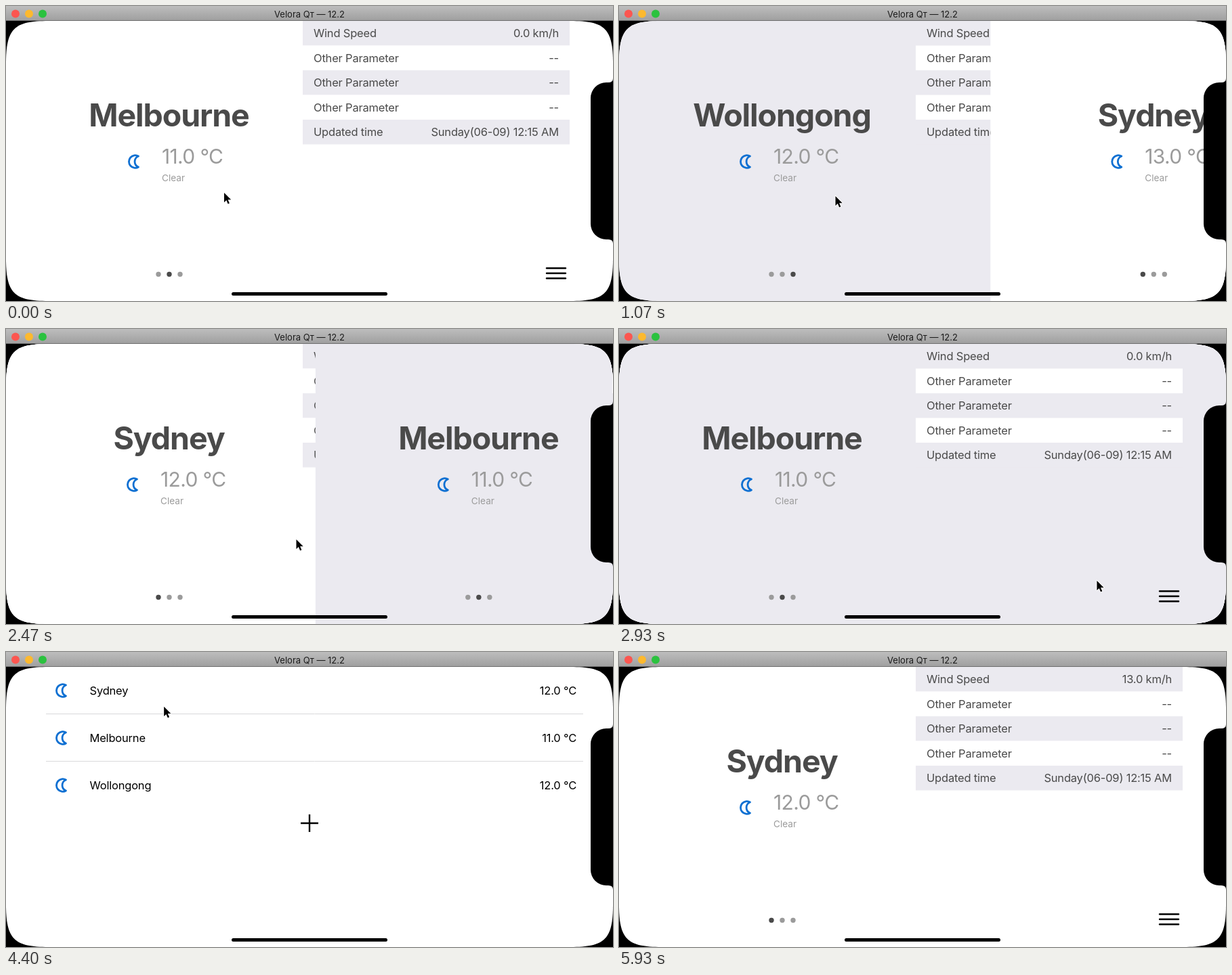
Recreate the animation shown at these times as an HTML page with a canvas. Size 896 by 436 pixels, loop 5.99 s.

```html
<!DOCTYPE html>
<html lang="en">
<head>
<meta charset="utf-8">
<title>Weather pages</title>
<style>
  html, body { margin: 0; width: 100%; height: 100%; overflow: hidden; background: #000; }
  canvas { display: block; }
</style>
</head>
<body>
<canvas id="stage" width="896" height="436"></canvas>
<script>
const ctx = document.getElementById('stage').getContext('2d');
const W = 896, H = 436, LOOP = 5990;
const LAVENDER = '#ebeaf0', BLUE = '#0f70d2';
const MOON = new Path2D('M6.5-8A9.3 9.3 0 1 0 6.5 8A8.6 8.6 0 0 1 6.5-8Z');
const ARROW = new Path2D('M0 0V14.2L3.3 11.1L5.6 16.4L7.9 15.4L5.6 10.2H10.2Z');
const NOTCH = new Path2D('M896 107Q896 113 889 113H886A23 23 0 0 0 863 136V322A23 23 0 0 0 886 345H889Q896 345 896 351Z');
// Display outline with continuous-curvature corners
const DISPLAY = new Path2D(`M63 22H833C884.5 22 896 33.5 896 85V373C896 424.5 884.5 436 833 436
  H63C11.5 436 0 424.5 0 373V85C0 33.5 11.5 22 63 22Z`);

const CITIES = [
  { name: 'Sydney', temp: '12.0 °C', wind: '13.0 km/h', left: 228 },
  { name: 'Melbourne', temp: '11.0 °C', wind: '0.0 km/h', left: 230 },
  { name: 'Wollongong', temp: '12.0 °C', wind: '13.0 km/h', left: 228 }
];
const SWIPES = [
  { at: 50, city: 2, bg: LAVENDER },
  { at: 949.5, city: 0, bg: '#fff' },
  { at: 2334.3, city: 1, bg: LAVENDER }
];
const SLIDE = 395, HERO = 492, CLOSE = 3320, OPEN = 4730, REFRESH = 1530;

// Pointer way points: time, x, y
const POINTER = [
  [0, 322, 276], [200, 322, 276], [600, 470, 288], [820, 480, 286], [1000, 319.5, 281],
  [1250, 319.5, 281], [1850, 803.5, 400], [2080, 803.5, 400], [2270, 640, 335], [2420, 434, 312],
  [2470, 428.5, 311], [2600, 428.5, 311], [3050, 805, 394], [3320, 805, 394], [3470, 660.5, 376],
  [3670, 600, 374], [4200, 320, 178], [4400, 233.5, 81], [4530, 190, 52], [5000, 190, 52],
  [5300, 300, 300], [5550, 380, 440], [LOOP, 380, 440]
];
const TEMP_STYLE = { weight: 370, track: -0.65 };

const mix = (a, b, k) => a + (b - a) * k;
const gray = v => `rgb(${v},${v},${v})`;

// cubic-bezier(.4, 0, .2, 1)
function ease(t) {
  if (t <= 0) return 0;
  if (t >= 1) return 1;
  let lo = 0, hi = 1, s;
  for (let i = 0; i < 20; i++) {
    s = (lo + hi) / 2;
    const x = 1.2 * s * (1 - s) ** 2 + 0.6 * s * s * (1 - s) + s ** 3;
    if (x < t) lo = s; else hi = s;
  }
  return s * s * (3 - 2 * s);
}

// Text whose capitals are centred on y
function text(str, x, y, size, color, { weight = 400, align = 'left', track = -0.2 } = {}) {
  ctx.font = `${weight} ${size}px Inter, sans-serif`;
  ctx.letterSpacing = track + 'px';
  ctx.textAlign = align;
  ctx.fillStyle = color;
  ctx.fillText(str, x, y + size * 0.364);
}

function line(x1, y1, x2, y2, width, color, cap = 'butt') {
  ctx.lineWidth = width;
  ctx.strokeStyle = color;
  ctx.lineCap = cap;
  ctx.beginPath();
  ctx.moveTo(x1, y1);
  ctx.lineTo(x2, y2);
  ctx.stroke();
}

function dot(x, y, r, color) {
  ctx.fillStyle = color;
  ctx.beginPath();
  ctx.arc(x, y, r, 0, 7);
  ctx.fill();
}

function moon(x, y) {
  ctx.save();
  ctx.translate(x, y);
  ctx.lineWidth = 2.8;
  ctx.lineJoin = 'round';
  ctx.strokeStyle = BLUE;
  ctx.stroke(MOON);
  ctx.restore();
}

function page(index, x, bg, { temp = CITIES[index].temp, bare = false } = {}) {
  const city = CITIES[index];
  ctx.save();
  ctx.translate(x, 0);
  ctx.fillStyle = bg;
  ctx.fillRect(0, 22, W, H);
  if (!bare) {
    text(city.name, 240.5, 161, 46.5, '#4a4a4a', { weight: 700, align: 'center', track: -1.1 });
    moon(city.left - 41, 230);
    text(temp, city.left, 222, 30, '#9b9b9b', TEMP_STYLE);
  }
  text('Clear', city.left, 254, 13.6, '#9b9b9b', { track: 0 });

  const rows = [['Wind Speed', city.wind], ['Other Parameter', '--'], ['Other Parameter', '--'],
    ['Other Parameter', '--'], ['Updated time', 'Sunday(06-09) 12:15 AM']];
  rows.forEach(([label, value], i) => {
    const y = 22 + 36.5 * i;
    ctx.fillStyle = i % 2 ? '#fff' : LAVENDER;
    ctx.fillRect(438, y, 394, 36.5);
    text(label, 454, y + 18.3, 16.5, '#4a4a4a');
    text(value, 816, y + 18.3, 16.5, '#4a4a4a', { align: 'right' });
  });

  for (let i = 0; i < 3; i++) {
    dot(225 + 16 * i, 396.5, 3.7, i === index ? '#4a4a4a' : '#9b9b9b');
    line(798, 387.5 + 7.5 * i, 826, 387.5 + 7.5 * i, 2.4, '#000', 'round');
  }
  ctx.restore();
}

function list(hidden) {
  ctx.fillStyle = '#fff';
  ctx.fillRect(0, 22, W, H);
  CITIES.forEach((city, i) => {
    const y = 57 + 70 * i;
    if (i < 2) line(59, y + 34.5, 852, y + 34.5, 1, '#d9d9db');
    if (i === hidden) return;
    moon(82, y);
    text(city.name, 123.5, y, 16.5, '#000');
    text(city.temp, 842, y, 16.5, '#000', { align: 'right' });
  });
  line(435, 253, 461, 253, 2.4, '#000');
  line(448, 240, 448, 266, 2.4, '#000');
}

// Title, moon and temperature travelling between list row and page
function hero(index, elapsed, opening) {
  const city = CITIES[index], row = 57 + 70 * index;
  const amount = duration => opening ? ease(elapsed / duration) : 1 - ease(elapsed / duration);

  let k = amount(336);
  moon(mix(82, city.left - 41, k), mix(row, 230, k));

  k = amount(376);
  ctx.font = '700 46.5px Inter, sans-serif';
  ctx.letterSpacing = '-1.1px';
  const titleLeft = 240.5 - ctx.measureText(city.name).width / 2;
  text(city.name, mix(123.5, titleLeft, k), mix(row, 161, k), mix(16.5, 46.5, k),
    gray(Math.round(74 * Math.sqrt(k))), { weight: Math.round(400 + 300 * k), track: mix(-0.2, -1.1, k) });

  k = amount(HERO);
  ctx.save();
  ctx.translate(mix(788, city.left, k), mix(row, 222, k));
  ctx.scale(mix(0.56, 1, amount(SLIDE)), mix(0.85, 1, k));
  text(city.temp, 0, 0, 30, gray(Math.round(mix(80, 155, k))), TEMP_STYLE);
  ctx.restore();
}

function screen(t) {
  if (t < CLOSE) {
    page(1, 0, '#fff');
    for (const { at, city, bg } of SWIPES) {
      if (t < at) break;
      const temp = city === 0 && t < REFRESH ? '13.0 °C' : CITIES[city].temp;
      page(city, W * (1 - ease((t - at) / SLIDE)), bg, { temp });
    }
  } else if (t < CLOSE + HERO) {
    list(1);
    hero(1, t - CLOSE, false);
    page(1, W * ease((t - CLOSE) / SLIDE), LAVENDER, { bare: true });
  } else if (t < OPEN) {
    list();
  } else if (t < OPEN + HERO) {
    list(0);
    page(0, W * (1 - ease((t - OPEN) / SLIDE)), '#fff', { bare: true });
    hero(0, t - OPEN, true);
  } else {
    page(0, 0, '#fff');
  }
}

function titleBar() {
  const shade = ctx.createLinearGradient(0, 0, 0, 21);
  shade.addColorStop(0, '#bdbdbd');
  shade.addColorStop(1, '#a0a0a0');
  ctx.fillStyle = shade;
  ctx.fillRect(0, 0, W, 22);
  line(0, 21.5, W, 21.5, 1, '#6e6e6e');
  ['#fc5650', '#fdb92e', '#2bc23f'].forEach((color, i) => dot(14 + 20 * i, 11.4, 6, color));
  text('Velora Qᴛ — 12.2', 448, 11.8, 13, '#1c1c1c', { align: 'center', track: 0 });
}

function pointer(t) {
  const i = POINTER.findIndex(p => p[0] > t);
  const [t0, x0, y0] = POINTER[i - 1], [t1, x1, y1] = POINTER[i];
  const k = (t - t0) / (t1 - t0);
  ctx.save();
  ctx.translate(mix(x0, x1, k), mix(y0, y1, k));
  ctx.lineWidth = 2;
  ctx.lineJoin = 'round';
  ctx.strokeStyle = '#fff';
  ctx.stroke(ARROW);
  ctx.fillStyle = '#000';
  ctx.fill(ARROW);
  ctx.restore();
}

function draw(now) {
  const t = now % LOOP;
  ctx.fillStyle = '#000';
  ctx.fillRect(0, 0, W, H);
  ctx.save();
  ctx.clip(DISPLAY);
  screen(t);
  ctx.restore();

  ctx.fillStyle = '#000';
  ctx.fill(NOTCH);
  line(335.5, 425.5, 560.5, 425.5, 5, '#000', 'round');
  titleBar();
  pointer(t);
}

const start = performance.now();
function tick() {
  draw(performance.now() - start);
  requestAnimationFrame(tick);
}
tick();
</script>
</body>
</html>
```
